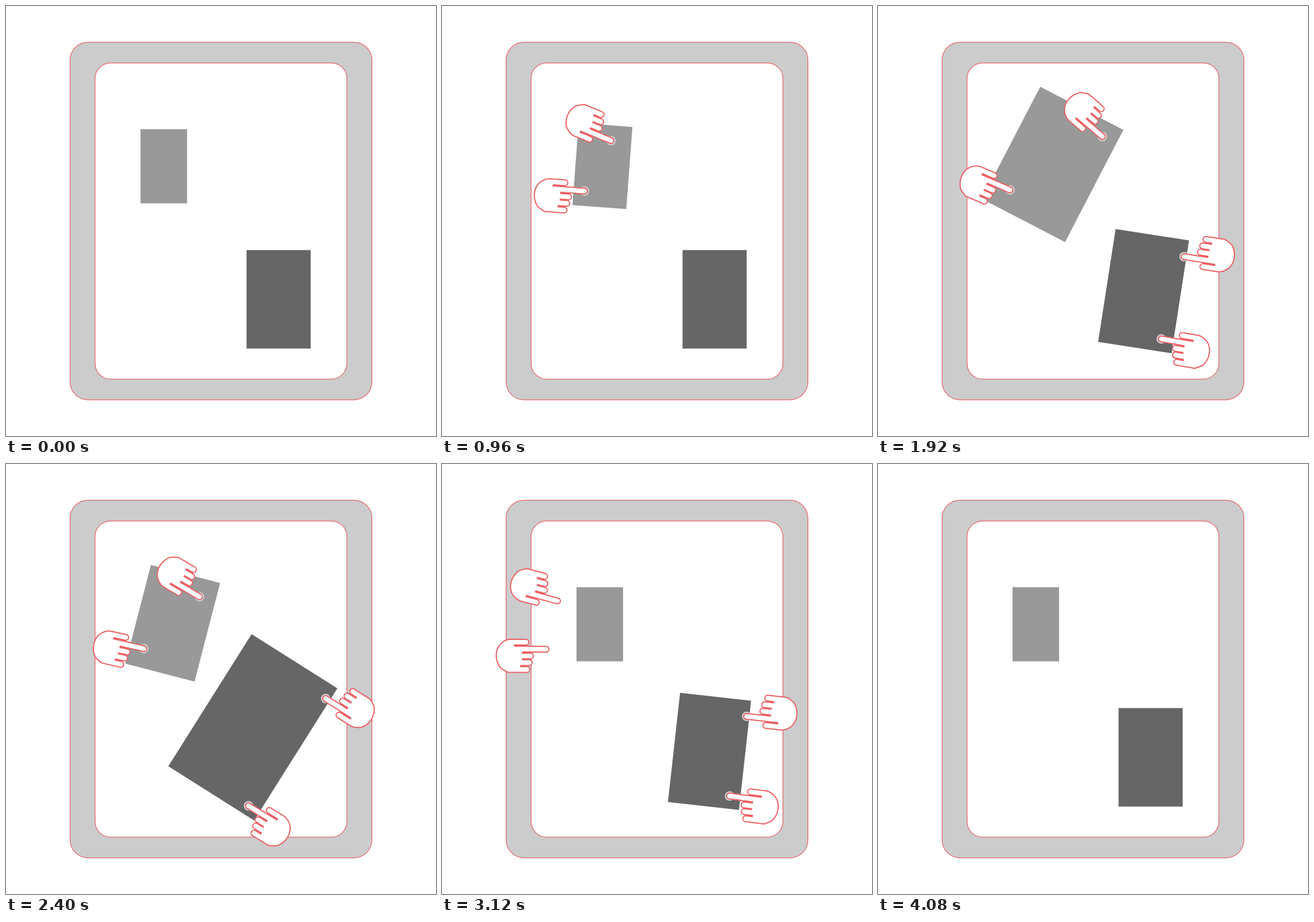
An HTML page that plays this animation: 748 px wide and 748 px high, repeating every 4.62 s.

```html
<!DOCTYPE html>
<html lang="en">
<head>
<meta charset="utf-8">
<title>Two-finger gestures</title>
<style>
html, body { margin: 0; width: 100%; height: 100%; overflow: hidden; background: #fff; }
svg { display: block; width: 100vw; height: 100vh; }
.line { stroke: #ec6064; }
</style>
</head>
<body>
<svg viewBox="0 0 748 748">
  <defs>
    <!-- Pointing hand, origin at the centre of the index fingertip -->
    <path id="hand" class="line" fill="#fff" stroke-width="2" stroke-linejoin="round" d="M-63-17H-35a5 5 0 0 1 0 10H-55v2H0a5 5 0 0 1 0 10H-41v2h14a5 5 0 0 1 0 10H-41v1.5h12a5 5 0 0 1 0 10H-44v2h11a5 5 0 0 1 0 10H-66Q-72 38-79 33C-89 20-89 3-80-8Q-72-16-63-17z"/>
  </defs>
  <g class="line" stroke-width="1.25">
    <rect x="111.5" y="63" width="525" height="622" rx="31" fill="#ccc"/>
    <rect x="155" y="99" width="438" height="550" rx="27" fill="#fff"/>
  </g>
  <g id="cards"></g>
  <g id="hands"></g>
</svg>
<script>
const LOOP = 4620, STEP = 60;

// times: enter, touch, peak, release, gone
// card poses: centre x, centre y, width, height, angle
// hand poses: x, y, angle
const gestures = [
  {
    times: [0, 840, 1740, 2940, 3840],
    fill: '#999',
    card: { rest: [274.5, 278.8, 81, 129, 0], peak: [309, 275, 177.3, 236, 32.3] },
    hands: [
      { flip: 'scale(1 -1)', enter: [-46, 250, 0], rest: [276, 235.4, 19], peak: [410.4, 225.5, 44.5], gone: [-99, 250, 0] },
      { flip: '', enter: [-54, 322, 0], rest: [251.3, 322.3, 0.5], peak: [225.6, 319.6, 27.5], gone: [-100, 322, 0] }
    ]
  },
  {
    times: [840, 1740, 2520, 3240, 4320],
    fill: '#666',
    card: { rest: [474.2, 510.2, 111.5, 171.3, 0], peak: [421.2, 448.5, 188.2, 289.8, 38.1] },
    hands: [
      { flip: 'scale(-1)', enter: [840, 493, 0], rest: [523.5, 446.5, 0], peak: [562, 401, 38.2], gone: [844, 493, 0] },
      { flip: 'scale(-1 1)', enter: [833.5, 560.2, 0], rest: [519.4, 573.4, 1.5], peak: [404, 598.4, 37], gone: [840, 560.2, 0] }
    ]
  }
];

function add(parent, tag, attrs) {
  const el = document.createElementNS('http://www.w3.org/2000/svg', tag);
  set(el, attrs);
  return parent.appendChild(el);
}

function set(el, attrs) {
  for (const key in attrs) el.setAttribute(key, attrs[key]);
}

// Linear interpolation through poses at the given times
function tween(time, times, poses) {
  if (time <= times[0]) return poses[0];
  const i = times.findIndex(t => time < t);
  if (i < 0) return poses[poses.length - 1];
  const k = (time - times[i - 1]) / (times[i] - times[i - 1]);
  return poses[i].map((v, j) => poses[i - 1][j] + (v - poses[i - 1][j]) * k);
}

const place = (x, y, angle) => `translate(${x} ${y}) rotate(${angle})`;

for (const g of gestures) {
  g.card.el = add(cards, 'rect', { fill: g.fill });
  for (const h of g.hands) {
    h.el = add(hands, 'g', {});
    h.dot = add(h.el, 'circle', { r: 8.3, fill: '#ccc' });
    add(h.el, 'use', { href: '#hand', transform: h.flip });
  }
}

function draw(time) {
  for (const { times, card, hands } of gestures) {
    const [x, y, width, height, angle] = tween(time, times.slice(1, 4), [card.rest, card.peak, card.rest]);
    set(card.el, { x: -width / 2, y: -height / 2, width, height, transform: place(x, y, angle) });
    const touching = time >= times[1] && time < times[3];
    for (const h of hands) {
      const pose = tween(time, times, [h.enter, h.rest, h.peak, h.rest, h.gone]);
      set(h.el, { transform: place(...pose) });
      set(h.dot, { visibility: touching ? 'visible' : 'hidden' });
    }
  }
}

const start = performance.now();
function tick() {
  const time = (performance.now() - start) % LOOP;
  draw(Math.floor(time / STEP) * STEP);
  requestAnimationFrame(tick);
}
tick();
</script>
</body>
</html>
```
